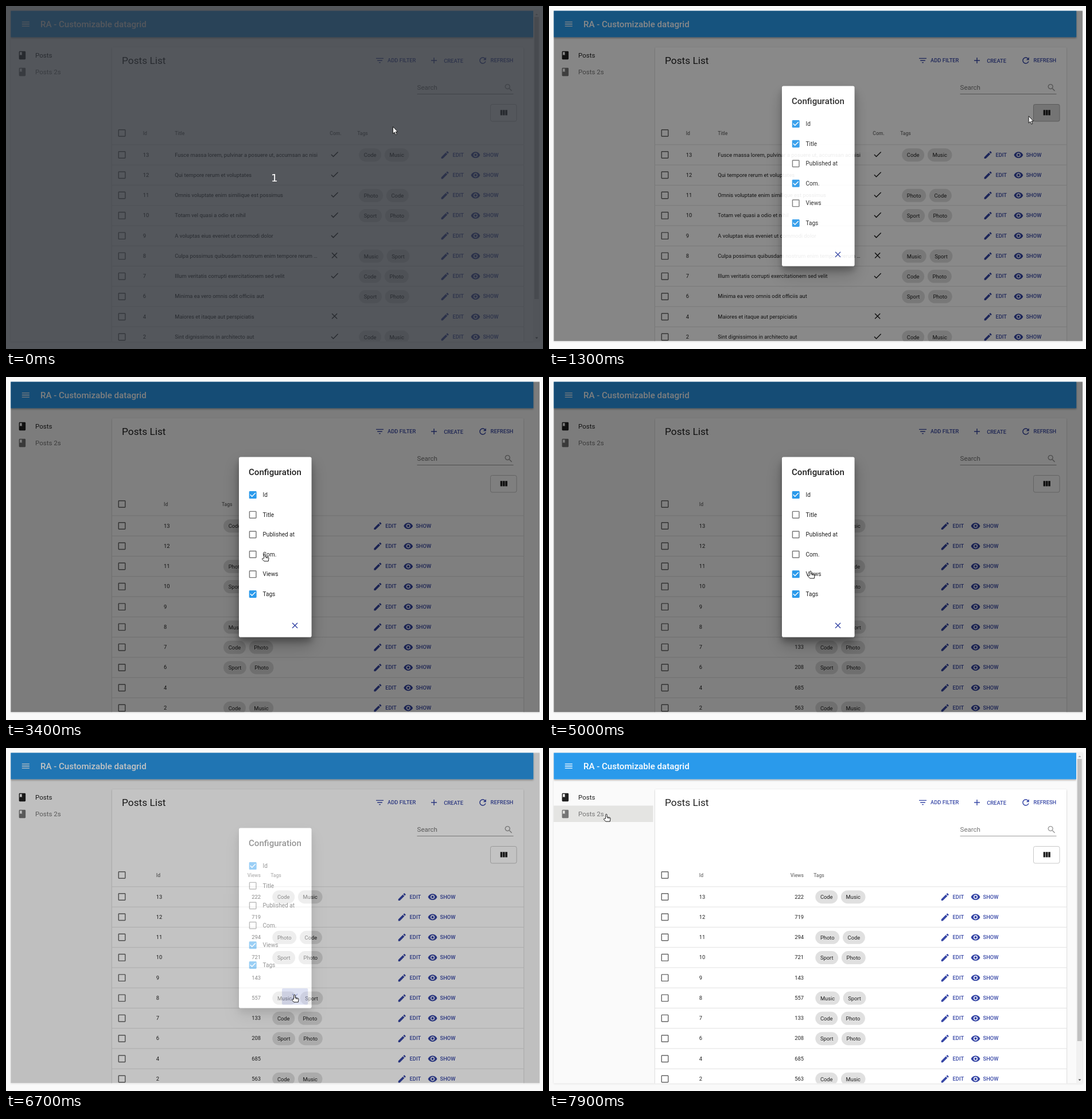
Recreate the animation shown at these times as an HTML page. Size 936 px wide and 598 px high, loop 8000 ms.

```html
<!DOCTYPE html>
<html lang="en">
<head>
<meta charset="utf-8">
<title>Customizable datagrid</title>
<style>
html, body { margin: 0; width: 100%; height: 100%; overflow: hidden; background: #f9f9f9; }
svg { display: block; width: 936px; height: 598px; font-family: Roboto, sans-serif; }
text { white-space: pre; }
</style>
</head>
<body>
<svg id="stage" viewBox="0 0 936 598" xmlns="http://www.w3.org/2000/svg"></svg>
<script>
const LOOP = 8000, STEP = 100, UNIT = 0.72;
const INK = '#202020', GREY = '#757575', BLUE = '#2b9aeb', INDIGO = '#3747a6';
const ROW_TOP = 241.8, ROW_H = 35.27, RIGHT_EDGE = 902;

const ICONS = {
  menu: 'M3 18h18v-2H3v2zm0-5h18v-2H3v2zm0-7v2h18V6H3z',
  book: 'M18 2H6c-1.1 0-2 .9-2 2v16c0 1.1.9 2 2 2h12c1.1 0 2-.9 2-2V4c0-1.1-.9-2-2-2zM6 4h5v8l-2.5-1.5L6 12V4z',
  filter: 'M10 18h4v-2h-4v2zM3 6v2h18V6H3zm3 7h12v-2H6v2z',
  add: 'M19 13h-6v6h-2v-6H5v-2h6V5h2v6h6v2z',
  refresh: 'M17.65 6.35C16.2 4.9 14.21 4 12 4c-4.42 0-7.99 3.58-7.99 8s3.57 8 7.99 8c3.73 0 6.84-2.55 7.73-6h-2.08c-.82 2.33-3.04 4-5.65 4-3.31 0-6-2.69-6-6s2.69-6 6-6c1.66 0 3.14.69 4.22 1.78L13 11h7V4l-2.35 2.35z',
  search: 'M15.5 14h-.79l-.28-.27C15.41 12.59 16 11.11 16 9.5 16 5.91 13.09 3 9.5 3S3 5.91 3 9.5 5.91 16 9.5 16c1.61 0 3.09-.59 4.23-1.57l.27.28v.79l5 4.99L20.49 19l-4.99-5zm-6 0C7.01 14 5 11.99 5 9.5S7.01 5 9.5 5 14 7.01 14 9.5 11.99 14 9.5 14z',
  columns: 'M10 18h5V5h-5v13zm-6 0h5V5H4v13zM16 5v13h5V5h-5z',
  edit: 'M3 17.25V21h3.75L17.81 9.94l-3.75-3.75L3 17.25zM20.71 7.04c.39-.39.39-1.02 0-1.41l-2.34-2.34c-.39-.39-1.02-.39-1.41 0l-1.83 1.83 3.75 3.75 1.83-1.83z',
  show: 'M12 4.5C7 4.5 2.73 7.61 1 12c1.73 4.39 6 7.5 11 7.5s9.27-3.11 11-7.5c-1.73-4.39-6-7.5-11-7.5zM12 17c-2.76 0-5-2.24-5-5s2.24-5 5-5 5 2.24 5 5-2.24 5-5 5zm0-8c-1.66 0-3 1.34-3 3s1.34 3 3 3 3-1.34 3-3-1.34-3-3-3z',
  yes: 'M9 16.17L4.83 12l-1.42 1.41L9 19 21 7l-1.41-1.41z',
  no: 'M19 6.41L17.59 5 12 10.59 6.41 5 5 6.41 10.59 12 5 17.59 6.41 19 12 13.41 17.59 19 19 17.59 13.41 12z',
  box: 'M19 5v14H5V5h14m0-2H5c-1.1 0-2 .9-2 2v14c0 1.1.9 2 2 2h14c1.1 0 2-.9 2-2V5c0-1.1-.9-2-2-2z',
  boxOn: 'M19 3H5c-1.11 0-2 .9-2 2v14c0 1.1.89 2 2 2h14c1.11 0 2-.9 2-2V5c0-1.1-.89-2-2-2zm-9 14l-5-5 1.41-1.41L10 14.17l7.59-7.59L19 8l-9 9z'
};

// id, title, com, views, tags
const POSTS = [
  [13, 'Fusce massa lorem, pulvinar a posuere ut, accumsan ac nisi', 'yes', 222, 'Code Music'],
  [12, 'Qui tempore rerum et voluptates', 'yes', 719, ''],
  [11, 'Omnis voluptate enim similique est possimus', 'yes', 294, 'Photo Code'],
  [10, 'Totam vel quasi a odio et nihil', 'yes', 721, 'Sport Photo'],
  [9, 'A voluptas eius eveniet ut commodi dolor', 'yes', 143, ''],
  [8, 'Culpa possimus quibusdam nostrum enim tempore rerum …', 'no', 557, 'Music Sport'],
  [7, 'Illum veritatis corrupti exercitationem sed velit', 'yes', 133, 'Code Photo'],
  [6, 'Minima ea vero omnis odit officiis aut', '', 208, 'Sport Photo'],
  [4, 'Maiores et itaque aut perspiciatis', 'no', 685, ''],
  [2, 'Sint dignissimos in architecto aut', 'yes', 563, 'Code Music']
];
const FIELDS = { id: 'Id', title: 'Title', date: 'Published at', com: 'Com.', views: 'Views', tags: 'Tags' };

// Columns share the free width in proportion to their natural width
const NATURAL = { select: 81, id: 101, title: 490, com: 87, views: 137, tags: 265, edit: 261 };
function layout(from, names) {
  const cols = ['select', ...names.split(' '), 'edit'];
  const scale = (RIGHT_EDGE - 194) / cols.reduce((sum, c) => sum + NATURAL[c], 0);
  const out = { from };
  let x = 194;
  for (const c of cols) {
    out[c] = x;
    x += NATURAL[c] * scale;
  }
  return out;
}
const LAYOUTS = [
  layout(0, 'id title com tags'), layout(2500, 'id com tags'),
  layout(3300, 'id tags'), layout(4700, 'id views tags')
];

// Cursor moves: start, end, x, y
const HOME = [674, 210];
const MOVES = [
  [0, 100, 715, 209], [100, 700, 857, 185], [1250, 1500, 788, 206], [1600, 2000, 430, 239],
  [2100, 2300, 448, 238], [2500, 3000, 451, 308], [3400, 3900, 449, 358], [4500, 4800, 456, 338],
  [5200, 6000, 503, 430], [6900, 7300, 319, 339], [7300, 7900, 100, 115]
];

const ramp = (t, from, span) => Math.min(1, Math.max(0, (t - from) / span));
const easeOut = p => 1 - (1 - p) ** 3;
const sineOut = p => Math.sin(p * Math.PI / 2);
const pulse = p => Math.sin(p * Math.PI);

const icon = (name, x, y, fill = INK) =>
  `<path d="${ICONS[name]}" fill="${fill}" transform="translate(${x} ${y}) scale(${UNIT}) translate(-12 -12)"/>`;
const text = (s, x, y, px, fill = INK, more = '') =>
  `<text x="${x}" y="${y}" font-size="${(px * UNIT).toFixed(2)}" fill="${fill}" ${more}>${s}</text>`;
const rect = (x, y, w, h, fill, more = '') =>
  `<rect x="${x}" y="${y}" width="${w}" height="${h}" fill="${fill}" ${more}/>`;
const MEDIUM = 'font-weight="500"', RIGHT = 'text-anchor="end"';
const button = (s, x, y) => text(s, x, y, 13, INDIGO, MEDIUM);
const frame = (fill, more) => rect(8.2, 8.2, 921.8, 576.2, fill, more);

const pen = document.createElement('canvas').getContext('2d');
pen.font = `${13 * UNIT}px Roboto, sans-serif`;

function chips(tags, x, y) {
  return tags.split(' ').filter(Boolean).map(tag => {
    const w = pen.measureText(tag).width + 24 * UNIT;
    const out = rect(x, y - 11.5, w, 23, '#e0e0e0', 'rx="11.5"') +
      text(tag, x + w / 2, y + 3.6, 13, INK, 'text-anchor="middle"');
    x += w + 8 * UNIT;
    return out;
  }).join('');
}

function table(cols, n) {
  const viewsEnd = cols.tags - 17.3;
  const head = (key, x = cols[key], more = '') =>
    key in cols ? text(FIELDS[key], x, 224.6, 12, GREY, MEDIUM + ' ' + more) : '';
  let out = head('id') + head('title') + head('com') + head('views', viewsEnd, RIGHT) + head('tags');
  POSTS.forEach(([id, title, com, views, tags], i) => {
    const y = ROW_TOP + ROW_H * (i + .5), base = y + 3.1;
    out += text(id, cols.id, base, 13);
    if (cols.title) out += text(title, cols.title, base, 13);
    if (cols.com && com) out += icon(com, cols.com + 8.4, y - .9);
    if (cols.views) out += text(views, viewsEnd, base, 13, INK, RIGHT);
    out += chips(tags, cols.tags + 3, y + .3) +
      icon('edit', cols.edit + 6.9, y + .2, INDIGO) + button('EDIT', cols.edit + 20.2, base) +
      icon('show', cols.edit + 60.2, y + .2, INDIGO) + button('SHOW', cols.edit + 73.2, base);
  });
  return `<g id="table${n}">${out}</g>`;
}

function rowFrame() {
  let out = icon('box', 202, 221.5, '#666');
  POSTS.forEach((_, i) => {
    const y = ROW_TOP + ROW_H * i;
    out += rect(185, y - .4, 717, .9, '#dedede') + icon('box', 202, y + ROW_H / 2 + .1, '#666');
  });
  return out;
}

function page() {
  return frame('#fafafa') +
    rect(8.2, 8.2, 911, 46.2, BLUE, 'filter="url(#barShadow)"') +
    icon('menu', 34.3, 31.5, '#fff') + text('RA - Customizable datagrid', 60, 36.5, 21, '#fff', MEDIUM) +
    rect(8, 100.5, 173.5, 28.5, '#e4e4e2', 'id="menuHover"') +
    icon('book', 28.4, 86) + text('Posts', 51, 89.8, 16) +
    icon('book', 28.4, 115, GREY) + text('Posts 2s', 51, 118.6, 16, GREY) +
    rect(185, 72, 717, 540, '#fff', 'rx="1.5" filter="url(#cardShadow)"') +
    text('Posts List', 202, 101, 24) +
    icon('filter', 651.5, 95, INDIGO) + button('ADD FILTER', 665, 98.2) +
    icon('add', 746, 95, INDIGO) + button('CREATE', 763.2, 98.6) +
    icon('refresh', 831, 95, INDIGO) + button('REFRESH', 844.6, 98.2) +
    text('Search', 716.6, 146, 16, GREY) + icon('search', 876, 142.4, '#a0a0a0') +
    rect(716.5, 153, 168, .8, '#858585') +
    rect(844.5, 171.5, 45.5, 29.5, 'none', 'rx="3" stroke="#c8c8c8"') +
    rect(844, 171, 46.5, 30.5, '#000', 'rx="3" id="columnPress"') +
    icon('columns', 867.4, 186.3) +
    rect(185, 0, 717, ROW_H, '#ebebeb', 'id="rowHover"') +
    rowFrame() + LAYOUTS.map(table).join('');
}

function scrollbar() {
  return '<g id="scrollbar">' + rect(919, 8, 11, 576.5, '#f1f1f1') + rect(920.8, 19, 8, 492, '#c1c1c1') +
    '<path d="M922.6 16h4.8l-2.4-2.8z" fill="#a3a3a3"/><path d="M922.6 577.5h4.8l-2.4 2.8z" fill="#505050"/></g>';
}

function dialog() {
  const fields = Object.entries(FIELDS).map(([key, label], i) => {
    const y = 205.6 + 48 * UNIT * i;
    return `<g id="off-${key}">${icon('box', 430.2, y, GREY)}</g><g id="on-${key}">${icon('boxOn', 430.2, y, BLUE)}</g>` +
      text(label, 447.5, y + 3.5, 14);
  }).join('');
  return '<g id="dialog">' + frame('#000', 'opacity=".5"') +
    rect(406, 139.5, 126.5, 314, '#fff', 'rx="2.8" filter="url(#dialogShadow)"') +
    text('Configuration', 423, 171, 21, INK, MEDIUM) + fields +
    rect(481, 419, 45.3, 28.5, '#3f51b5', 'rx="2" id="closePress"') +
    icon('no', 503.6, 433.2, INDIGO) + '</g>';
}

// Each layer: offset, blur, opacity
const shadow = (id, ...layers) =>
  `<filter id="${id}" x="-60%" y="-60%" width="220%" height="220%">` + layers.map(([dy, blur, alpha]) =>
    `<feDropShadow dx="0" dy="${dy}" stdDeviation="${blur}" flood-opacity="${alpha}"/>`).join('') + '</filter>';

document.getElementById('stage').innerHTML =
  '<defs>' + shadow('barShadow', [1.6, 1.8, .35]) + shadow('cardShadow', [.8, 1.2, .28]) +
  shadow('dialogShadow', [8, 5.4, .24], [12, 14, .26]) + shadow('frameShadow', [.5, 1.3, .16]) +
  `<clipPath id="frame">${frame('#000')}</clipPath></defs>` +
  rect(0, 0, 936, 598, '#f9f9f9') + frame('#fafafa', 'filter="url(#frameShadow)"') +
  '<g clip-path="url(#frame)">' + page() + scrollbar() + dialog() +
  '<g id="status">' + rect(7, 567.5, 308, 20, '#f2f2f2', 'rx="2" stroke="#dcdcdc" stroke-width=".8"') +
  '<text x="10" y="580" font-size="10.5" fill="#808080" font-family="DejaVu Sans, sans-serif">localhost:8080/#/tags/5</text></g></g>' +
  '<g id="countdown">' + rect(0, 0, 936, 598, 'rgba(42,46,52,.8)') +
  '<text x="468" y="305.5" font-size="18.5" fill="#fff" text-anchor="middle" font-family="DejaVu Sans, sans-serif">1</text></g>' +
  '<g id="cursor" stroke="#111" stroke-width=".95" stroke-linejoin="round" fill="#fff">' +
  '<path id="arrow" d="M.4 .4V12.6L3.2 10 5.2 14.5 7.2 13.6 5.2 9.3H8.8Z"/>' +
  '<path id="hand" d="M-1.3 8V1.5a1.2 1.2 0 0 1 2.4 0V5.4l4.6.8q1.5.3 1.3 1.9l-.7 5H-1.2L-4.6 9.4q.1-1.6 1.7-1.1ZM2.6 6v2M4.8 6.4v1.9"/></g>';

const el = {};
document.querySelectorAll('#stage [id]').forEach(node => el[node.id] = node);
const show = (node, on) => node.style.display = on ? '' : 'none';
const fade = (node, alpha) => { node.setAttribute('opacity', alpha); show(node, alpha > 0); };

function cursorAt(t) {
  let [x, y] = HOME;
  for (const [from, to, toX, toY] of MOVES) {
    const p = sineOut(ramp(t, from, to - from));
    x += (toX - x) * p;
    y += (toY - y) * p;
  }
  return [x, y];
}

function draw(ms) {
  const t = Math.floor(ms / STEP) * STEP;
  const [x, y] = cursorAt(t);
  const open = easeOut(ramp(t, 1170, 228)) - easeOut(ramp(t, 6650, 225));
  const current = LAYOUTS.filter(l => l.from <= t).pop();

  LAYOUTS.forEach((l, i) => show(el['table' + i], l === current));
  for (const key in FIELDS) {
    show(el['on-' + key], key in current);
    show(el['off-' + key], !(key in current));
  }

  const row = Math.floor((y - ROW_TOP) / ROW_H);
  const onMenu = !open && x < 181 && y > 100.5 && y < 129;
  const onColumns = !open && x > 844 && y > 171 && y < 201;
  const onDialog = open && x > 406 && x < 532;
  show(el.menuHover, onMenu);
  show(el.rowHover, !open && x > 185 && row >= 0);
  el.rowHover.setAttribute('y', ROW_TOP + ROW_H * row);

  fade(el.columnPress, Math.max(onColumns ? .08 : 0, .15 * pulse(ramp(t, 1050, 450))));
  fade(el.closePress, .36 * ramp(t, 6200, 300));
  fade(el.dialog, open);
  fade(el.status, ramp(t, 6850, 100) - ramp(t, 7270, 100));
  show(el.scrollbar, !open);
  show(el.countdown, t < 100);

  const hand = onMenu || onColumns || onDialog;
  el.cursor.setAttribute('transform', `translate(${x.toFixed(1)} ${y.toFixed(1)})`);
  show(el.arrow, !hand);
  show(el.hand, hand);
}

const start = performance.now();
function tick() {
  draw((performance.now() - start) % LOOP);
  requestAnimationFrame(tick);
}
tick();
</script>
</body>
</html>
```
